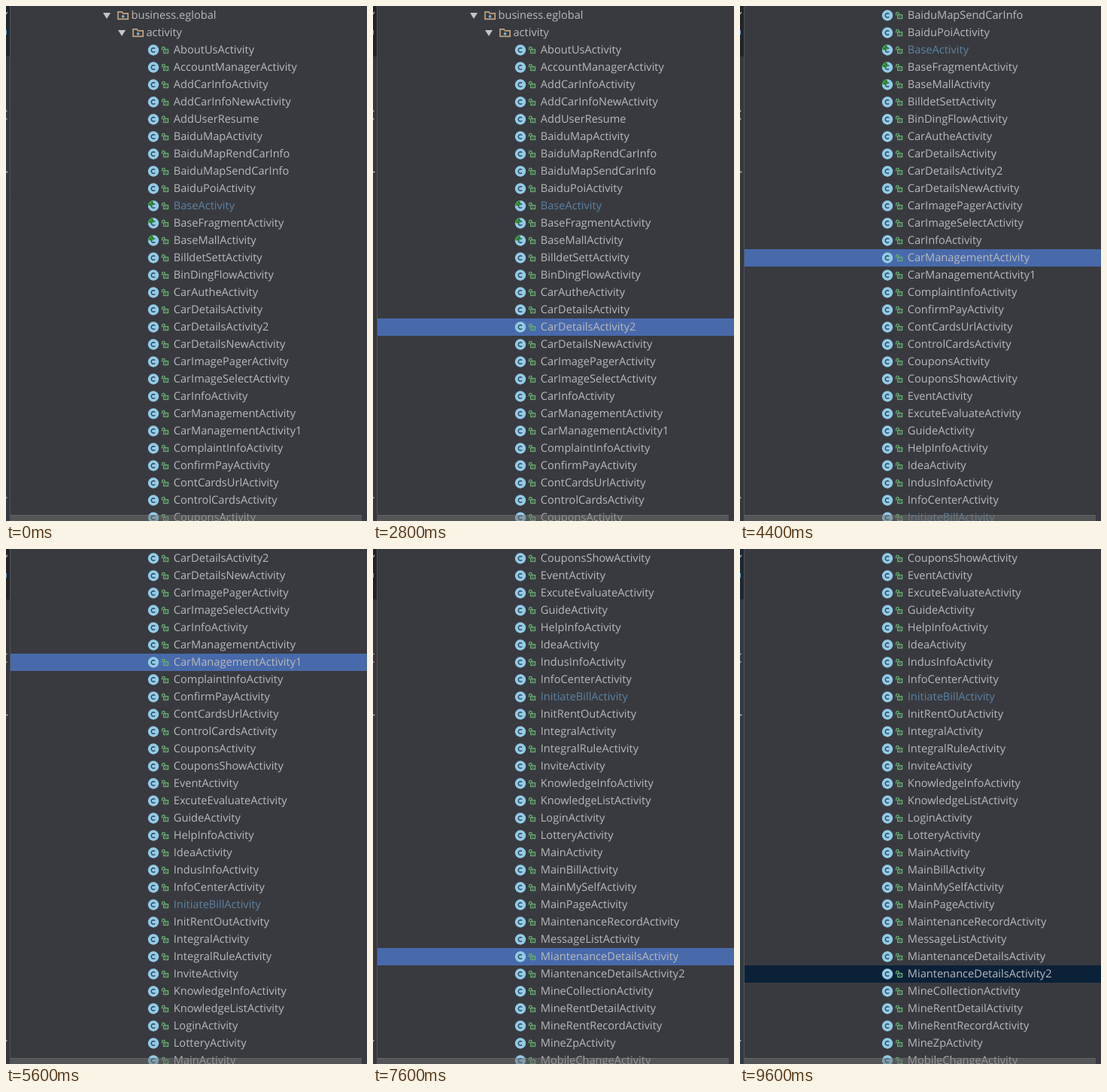
Write an HTML page that moves like this. It is 480 by 684 pixels and loops after 10000 ms.

```html
<!DOCTYPE html>
<html lang="en">
<head>
<meta charset="utf-8">
<title>Class tree</title>
<style>
  html, body { margin: 0; width: 100%; height: 100%; overflow: hidden; background: #393a3f; }
  #stage { position: relative; width: 480px; height: 684px; overflow: hidden; }
  #list { position: absolute; left: 6px; top: 1px; right: 0; animation: scroll 10s step-end infinite; }
  #pick { position: absolute; left: 0; right: 0; top: 0; height: 23px; animation: pick 10s step-end infinite; }
  .row {
    position: relative; height: 23px; line-height: 23px; white-space: pre; color: #b9babc;
    font-family: "Open Sans", "Noto Sans", sans-serif; font-size: 14.6px; text-rendering: geometricPrecision;
  }
  .row.edited { color: #5b83a4; }
  .row span { position: absolute; top: 0; }
  .row svg { position: absolute; left: 0; top: 0; width: 230px; height: 23px; }
  #edge { position: absolute; left: 0; top: 0; }
  #edge .head { animation: head 10s step-end infinite; }
  #edge .body { animation: body 10s step-end infinite; }
  #thumb {
    position: absolute; left: 6px; top: 676px; width: 467px; height: 8px; box-sizing: border-box;
    background: rgba(112, 112, 112, .5); border-top: 1px solid rgba(130, 130, 130, .35);
  }

  @keyframes scroll {
    0% { transform: translateY(0); }
    32% { transform: translateY(-207px); }
    56% { transform: translateY(-414px); }
    60% { transform: translateY(-552px); }
    64%, 100% { transform: translateY(-690px); }
  }
  @keyframes pick {
    0% { transform: translateY(391px); background: transparent; }
    20% { transform: translateY(391px); background: #486aab; }
    28% { transform: translateY(414px); background: #486aab; }
    44% { transform: translateY(529px); background: #486aab; }
    48% { transform: translateY(552px); background: #486aab; }
    76% { transform: translateY(1219px); background: #486aab; }
    80% { transform: translateY(1242px); background: #486aab; }
    96%, 100% { transform: translateY(1242px); background: #0b2138; }
  }
  @keyframes head {
    0%, 96%, 100% { fill: #1c2830; }
    4% { fill: #222327; }
  }
  @keyframes body {
    0%, 96%, 100% { fill: #303c43; }
    4% { fill: #37383d; }
  }
</style>
</head>
<body>
<svg width="0" height="0" style="position:absolute">
  <defs>
    <symbol id="class" viewBox="0 0 28 23" overflow="visible">
      <circle cx="7.5" cy="11.5" r="7.2" fill="#92cbe8"/>
      <path d="M9.6 9.6A2.8 2.8 0 1 0 9.6 13.4" fill="none" stroke="#2d4754" stroke-width="1.4"/>
    </symbol>
    <symbol id="abstract" viewBox="0 0 28 23" overflow="visible">
      <path d="M.5 11.5A7 7 0 0 1 7.5 4.5V11.5Z" fill="#3fa447"/>
      <path d="M2 8.5L5.5 11M4.5 6L7 9" stroke="#1f5d2a" stroke-width="1.2"/>
    </symbol>
    <symbol id="lock" viewBox="0 0 28 23" overflow="visible">
      <path d="M19.1 11.5V9.2a1.8 1.8 0 0 1 3.6 0V10.5" fill="none" stroke="#66ad70" stroke-width="1.4"/>
      <rect x="21.2" y="10.7" width="5.8" height="4.8" fill="none" stroke="#66ad70" stroke-width="1.4"/>
      <path d="M24.1 12.2V14" stroke="#66ad70"/>
    </symbol>
    <symbol id="folder" viewBox="0 0 34 23" overflow="visible">
      <path d="M0 8H10L5 16Z" fill="#c4c5c6"/>
      <path d="M20 6.9H25L26.5 8.8H33.2V16.4H20Z" fill="none" stroke="#bfa382" stroke-width="1.7"/>
      <circle cx="26.6" cy="12.8" r="1.9" fill="#7fb0cf"/>
    </symbol>
  </defs>
</svg>

<div id="stage">
  <div id="list"><div id="pick"></div></div>
  <svg id="edge" width="6" height="684">
    <rect class="head" width="5" height="67"/>
    <rect class="body" y="67" width="5" height="617"/>
    <path d="M5.5 0V684" stroke="#515256"/>
    <path d="M0 11L2 8M0 139.5H1.5M0 150H1.5M0 220.5H2.5M0 653H1.5" stroke="#b4b8ba" stroke-width="1.3"/>
    <path d="M.5 32V38" stroke="#5c9bd0"/>
  </svg>
  <div id="thumb"></div>
</div>

<script>
  // "+" marks an abstract class, "*" an edited file; "~" stands for the common suffix.
  const names = `AboutUs~ AccountManager~ AddCarInfo~ AddCarInfoNew~ AddUserResume BaiduMap~
    BaiduMapRendCarInfo BaiduMapSendCarInfo BaiduPoi~ +*Base~ +BaseFragment~ +BaseMall~
    BilldetSett~ BinDingFlow~ CarAuthe~ CarDetails~ CarDetails~2 CarDetailsNew~
    CarImagePager~ CarImageSelect~ CarInfo~ CarManagement~ CarManagement~1 ComplaintInfo~
    ConfirmPay~ ContCardsUrl~ ControlCards~ Coupons~ CouponsShow~ Event~ ExcuteEvaluate~
    Guide~ HelpInfo~ Idea~ IndusInfo~ InfoCenter~ *InitiateBill~ InitRentOut~ Integral~
    IntegralRule~ Invite~ KnowledgeInfo~ KnowledgeList~ Login~ Lottery~ Main~ MainBill~
    MainMySelf~ MainPage~ MaintenanceRecord~ MessageList~ MiantenanceDetails~
    MiantenanceDetails~2 MineCollection~ MineRentDetail~ MineRentRecord~ MineZp~
    MobileChange~`.split(/\s+/);

  const list = document.getElementById("list");

  function addRow(text, textX, icons, iconX, iconW, edited) {
    const uses = icons.map(id =>
      `<use href="#${id}" x="${iconX}" y="0" width="${iconW}" height="23"/>`).join("");
    const row = document.createElement("div");
    row.className = edited ? "row edited" : "row";
    row.innerHTML = `<svg>${uses}</svg><span style="left:${textX}px">${text}</span>`;
    list.append(row);
  }

  addRow("business.eglobal", 160.5, ["folder"], 123, 34);
  addRow("activity", 180.5, ["folder"], 143, 34);
  for (const name of names) {
    const icons = name.includes("+") ? ["class", "abstract", "lock"] : ["class", "lock"];
    const text = name.replace(/[+*]/g, "").replace("~", "Activity");
    addRow(text, 216.8, icons, 182.5, 28, name.includes("*"));
  }
</script>
</body>
</html>
```
